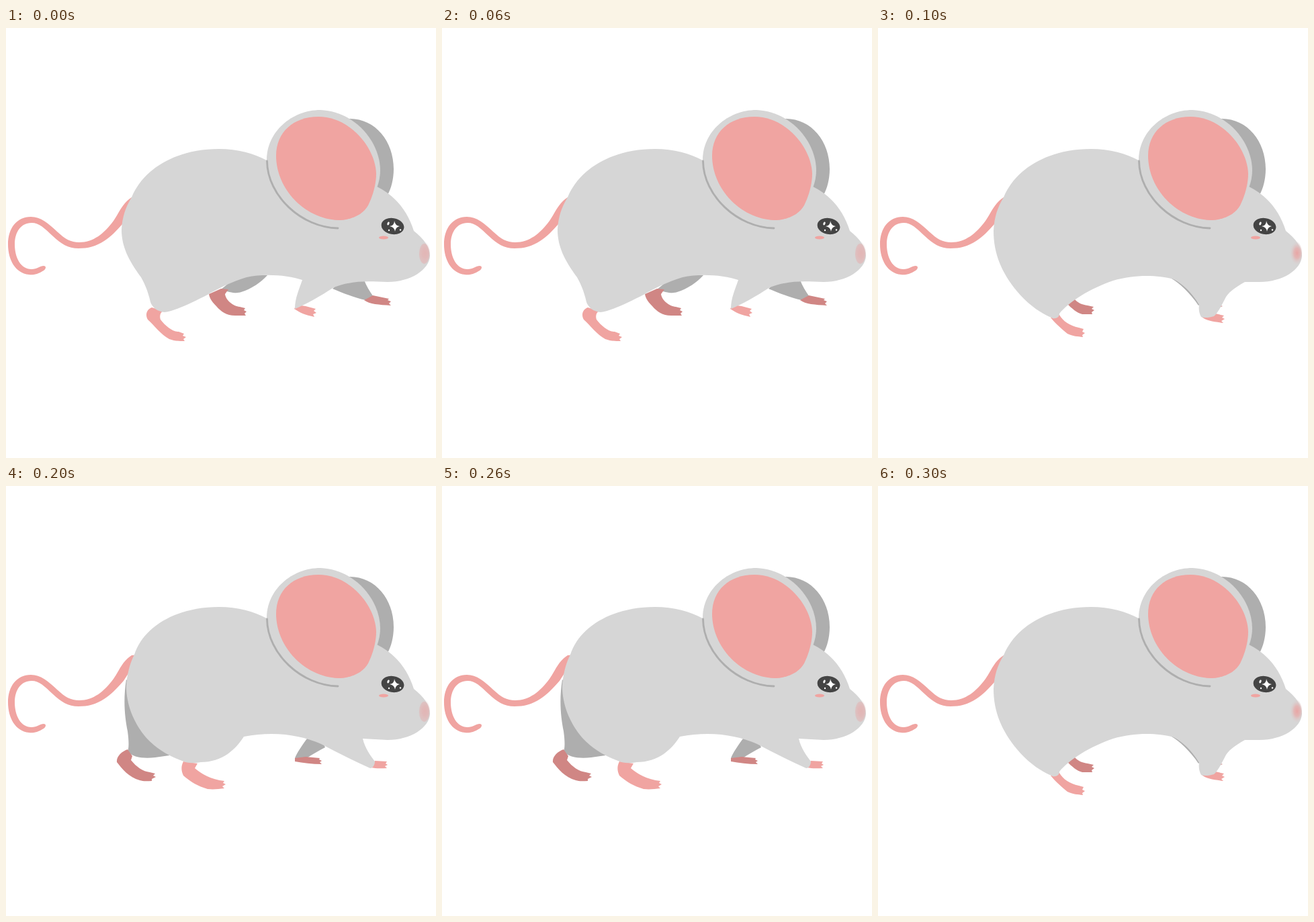
An HTML page that plays this animation: 640x640 px, repeating every 0.4 s.

```html
<!DOCTYPE html>
<html lang="en">
<head>
<meta charset="utf-8">
<title>Walking mouse</title>
<style>
  html, body { margin: 0; height: 100%; overflow: hidden; background: #fff; }
  svg { display: block; width: 100vw; height: 100vh; }
  .fur { fill: #d6d6d6; }
  .shade { fill: #aeaeae; }
  .pink { fill: #f0a4a1; }
  .rose { fill: #d08684; }
</style>
</head>
<body>
<svg viewBox="0 0 640 640">
  <defs>
    <radialGradient id="blush" cx=".68">
      <stop offset="0" stop-color="#e8a6a5"/>
      <stop offset=".4" stop-color="#e5b0af" stop-opacity=".85"/>
      <stop offset="1" stop-color="#d6d6d6" stop-opacity="0"/>
    </radialGradient>
  </defs>

  <!-- tail -->
  <path class="pink" d="M56 354C60 354 60 358 56 361C47 367 39 368 34 367C14 365 3 345 3 322C3 298 16 281 37 281C52 281 63 291 76 303C88 314 96 319 109 319C130 319 146 306 160 287C169 274 173 261 187 252L200 251L175 290C165 301 156 311 146 317C134 325 122 328 108 328C92 328 82 321 70 310C57 298 50 290 38 290C22 290 13 304 13 322C13 342 22 359 38 359C46 359 51 354 56 354Z"/>

  <path id="farLegs" class="shade"/>
  <path id="farFeet" class="rose"/>
  <path id="nearFeet" class="pink"/>
  <path class="shade" d="M510 135C549 134 577 168 577 210C577 225 573 240 568 248L540 238L520 180L500 135Z"/>
  <path id="body" class="fur"/>

  <!-- near ear -->
  <path class="fur" d="M388 196C388 155 425 122 468 122C520 124 557 170 557 212C557 221 555 230 552 238L494 298C440 297 388 250 388 196Z"/>
  <path fill="none" stroke="#aeaeae" stroke-width="2.8" stroke-linecap="round" d="M388.500 198C389 250 440 297 494 298"/>
  <path class="pink" d="M402 190C402 155 428 132 465 132C512 132 550 178 551 217C551 232 546 250 539 264C532 277 515 286 494 286C445 284 402 240 402 190Z"/>

  <!-- face -->
  <ellipse cx="575.500" cy="295" rx="17" ry="12" fill="#444" transform="rotate(10 575.500 295)"/>
  <path fill="#fff" d="M578 287Q579 294 586 295Q580 296 579 303Q578 296 571 295Q578 294 578 287Z"/>
  <ellipse cx="569" cy="291" rx="1.500" ry="2.600" fill="#fff" transform="rotate(20 569 291)"/>
  <circle cx="570" cy="301" r="1.200" fill="#fff"/>
  <circle cx="587" cy="300.500" r="1.200" fill="#fff"/>
  <ellipse class="pink" cx="562" cy="312" rx="7" ry="2.500"/>
  <ellipse id="nose" cx="619.500" cy="335" rx="11.500" ry="19" fill="url(#blush)"/>
  <ellipse id="noseTip" cx="622.500" cy="336" rx="7.500" ry="15" fill="#e5aeae"/>
</svg>
<script>
const part = id => document.getElementById(id);

// Back and head stay still; each pose supplies the belly and rump between them.
const back = 'C205 208 255 180 317 180C345 180 370 187 388 197L552 236C580 250 598 273 607 302C622 314 631 326 631 339C630 360 602 378 568 378';

const stride = {
  body: `M187 252${back}C545 378 520 374 488 386C468 399 445 412 430 418
    C430 402 436 390 441 375C420 368 385 365 358 371C335 378 315 388 300 397
    C278 408 255 420 236 423C225 422 218 416 215 408C211 390 206 380 201 371
    C182 345 172 325 172 300C173 280 179 265 187 252Z`,
  farLegs: `M320 389C335 395 345 395 350 393C366 388 380 378 389 368L350 365Z
    M486 388C500 394 520 402 535 405L547 400C541 392 536 383 533 375L500 375Z`,
  farFeet: `M302 396C303 403 308 409 313 414C320 422 328 428 341 428L357 428L355 425L358 422L354 420L356 417L348 415
    C338 414 327 405 326 396L331 389L320 388Z
    M533 405C541 411 555 412 573 413L570 410L573 407L568 405L570 403L546 398Z`,
  nearFeet: `M217 416C209 419 207 427 211 434C221 443 230 456 243 463C251 466 258 466 266 466L264 463L268 460L263 458L265 455L257 452
    C247 452 237 443 230 434C228 428 230 423 234 421Z
    M432 412L429 418C438 424 445 427 459 430L457 426L462 424L458 421L461 418L446 414Z`,
  noseTip: .5
};

const gather = {
  body: `M187 252${back}L546 378C530 387 521 394 517 402C511 414 505 425 500 429
    C494 431 486 432 481 430C478 425 477 418 478 412C466 392 452 380 440 374
    C415 367 380 367 350 376C315 388 285 407 270 425C270 430 266 433 260 432
    C240 424 220 408 207 392C184 364 172 336 172 302C173 280 179 265 187 252Z`,
  farLegs: 'M437 373C448 379 465 395 477 413L490 400L450 373Z',
  farFeet: `M281 410C288 417 296 424 304 426L319 426L318 423L322 420L318 418L321 415L312 413C304 412 297 409 292 403Z
    M508 409L512 410L510 413L513 414L507 416Z`,
  nearFeet: `M257 431C265 441 275 449 282 455C290 459 297 459 305 460L304 457L308 454L304 452L306 448L299 446
    C285 443 275 436 270 427Z
    M482 430C488 436 500 437 514 439L511 436L516 433L512 431L515 428L502 425Z`,
  noseTip: 0
};

const reach = {
  body: `M191 251${back}L531 376C534 390 543 402 549 410C549 415 546 420 542 420
    C515 408 490 395 469 384C440 371 400 364 354 373C342 392 322 411 290 411
    C280 413 270 413 262 409C243 402 225 392 209 375C190 353 179 325 179 298
    C180 280 185 262 191 251Z`,
  farLegs: `M179 288C174 320 177 345 181 365C183 380 183 390 181 395C188 404 205 406 222 404L243 401L230 350Z
    M448 376C440 387 433 397 430 405L446 406C455 400 465 394 475 389L470 378Z`,
  farFeet: `M181 392C172 395 164 403 165 411C172 420 183 434 199 438C205 440 211 439 217 439L217 436L223 433L219 431L222 428L214 426
    C204 425 194 418 186 408L188 402Z
    M430 405L430 410C442 412 455 414 470 414L467 411L470 409L466 407L467 405L446 403Z`,
  nearFeet: `M264 410C260 418 261 424 264 431C274 440 286 447 300 451C309 452 316 451 325 450L322 447L327 444L323 442L325 439
    C305 437 290 428 281 420L285 413Z
    M549 409L543 419C552 421 560 420 567 420L564 417L568 415L565 413L567 410Z`,
  noseTip: .45
};

const poses = [stride, gather, reach, gather];
const poseTime = 100;
let current;

function draw() {
  const pose = poses[Math.floor(performance.now() / poseTime) % poses.length];
  if (pose !== current) {
    current = pose;
    for (const id of ['body', 'farLegs', 'farFeet', 'nearFeet']) part(id).setAttribute('d', pose[id]);
    part('noseTip').setAttribute('opacity', pose.noseTip);
    part('nose').setAttribute('opacity', 1 - pose.noseTip);
  }
  requestAnimationFrame(draw);
}
draw();
</script>
</body>
</html>
```
